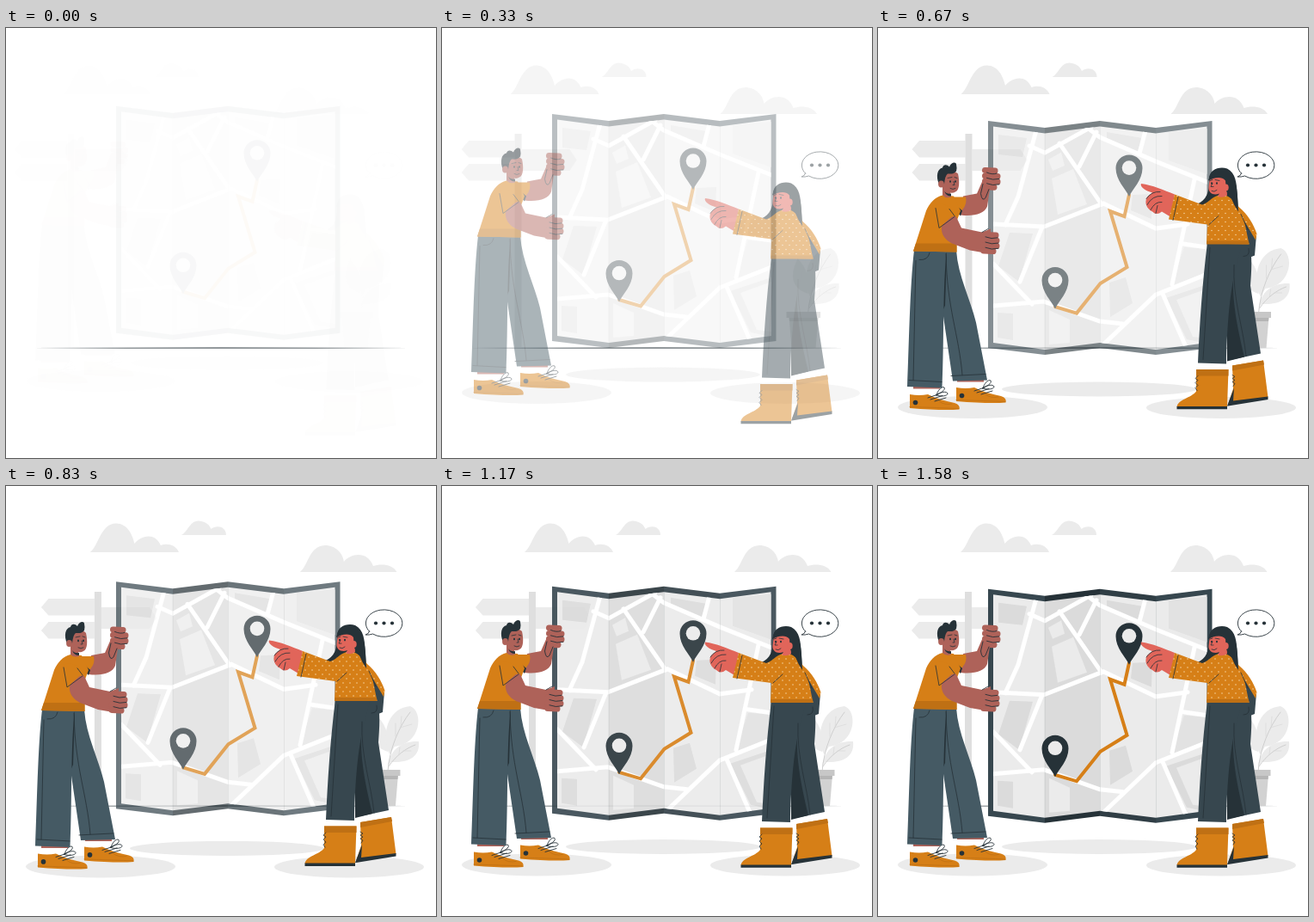
Write an HTML page with a canvas that moves like this. It is 500 by 500 pixels and loops after 1620 ms.

```html
<!DOCTYPE html>
<html lang="en">
<head>
<meta charset="utf-8">
<title>Map guide</title>
<style>
html, body { margin: 0; width: 100%; height: 100%; overflow: hidden; background: #fff; }
canvas { display: block; width: 500px; height: 500px; }
</style>
</head>
<body>
<canvas id="stage"></canvas>
<script>
const LOOP = 1620, LEAD = 30, SIZE = 500;
const INK = '#263238', SLATE = '#37474f', STEEL = '#455a64';
const ORANGE = '#d67f17', RUST = '#bf7014', TAN = '#ae6259', CORAL = '#e1655a';
const PALE = '#ebebeb', GREY = '#dbdbdb', WHITE = '#fff';

const ratio = window.devicePixelRatio || 1;
const stage = document.getElementById('stage');
const buffer = document.createElement('canvas');
for (const c of [stage, buffer]) c.width = c.height = Math.round(SIZE * ratio);
const screen2d = stage.getContext('2d');
const ctx = buffer.getContext('2d');

// Drawing helpers
function fill(color, path) {
  ctx.fillStyle = color;
  ctx.fill(new Path2D(path));
}
function line(path, color = INK, width = 0.8) {
  ctx.strokeStyle = color;
  ctx.lineWidth = width;
  ctx.stroke(new Path2D(path));
}
function oval(color, x, y, rx, ry = rx) {
  ctx.fillStyle = color;
  ctx.beginPath();
  ctx.ellipse(x, y, rx, ry, 0, 0, Math.PI * 2);
  ctx.fill();
}
function clipped(path, draw) {
  ctx.save();
  ctx.clip(new Path2D(path));
  draw();
  ctx.restore();
}

// Scenery
function drawFloor() {
  fill(INK, 'M30 372Q250 370.9 470 372Q250 373.1 30 372Z');
}
function drawShadows() {
  oval(PALE, 257, 419.5, 113, 8.5);
  oval(PALE, 110, 440.5, 87, 13);
  oval(PALE, 399, 441, 87, 12.5);
}
function drawClouds() {
  fill(PALE, 'M96 77C106 69 108 44 126 43.5C139 43.5 145 56 147.500 67C154 59 170 52 178 69C186 66 196 69 199 77Z');
  fill(PALE, 'M202 57C210 53 211 41 222 40.500C231 41 235 46 236.500 50C243 45 254 47 254 57Z');
  fill(PALE, 'M340 100C350 92 350 70 369 69C382 69 390 79 391 88C398 79 418 74 425 93C434 90 448 91 452.500 100Z');
}
function drawSign() {
  fill(PALE, 'M39 141L47.500 131H101V150.500H47.500ZM39 168L47.500 158H101V177.500H47.500Z');
  fill(PALE, 'M109 141H165L173 153.500L165 166H109Z');
  fill('#dfdfdf', 'M101 123H109V372H101Z');
}
function drawPlant() {
  fill(PALE, 'M442 309C423 303 420 288 430 268C442 279 444 296 442 309Z');
  fill(PALE, 'M442 307C435 282 445 258 468 256C484 262 481 300 450 303L444 312Z');
  fill(PALE, 'M442 325C445 305 460 296 478 297C480 315 466 322 446 321Z');
  line('M442 332C444 305 455 280 468 263M443 326C452 313 463 305 474 301', '#cfcfcf', 1);
  line('M451 291L451 276M456 281L470 277M457 281L458 268M455 312L456 304M460 308L469 308', '#d8d8d8', 0.7);
  fill('#d2d2d2', 'M420 336H454L451 372H423Z');
  fill('#b5b5b5', 'M420 336H454L453.500 341H420.500Z');
  fill('#c7c7c7', 'M417 330H456.500V337H417Z');
}

// Map
function drawPin(x, y) {
  fill(INK, `M${x} ${y + 33}C${x - 4} ${y + 24} ${x - 15.5} ${y + 14} ${x - 15.5} ${y}
    A15.5 15.5 0 0 1 ${x + 15.5} ${y}C${x + 15.5} ${y + 14} ${x + 4} ${y + 24} ${x} ${y + 33}Z`);
  oval(PALE, x, y - 0.5, 8.3);
}
function drawMap() {
  const edges = [128, 194, 258, 323, 388.5];
  const folds = [0, 8, 0, 8, 0];
  const frame = [SLATE, INK, '#303e45', SLATE];
  const paper = [PALE, GREY, PALE, PALE];
  ctx.translate(0, 0.8);
  frame.forEach((color, i) => {
    const a = edges[i], b = edges[i + 1], p = folds[i], q = folds[i + 1];
    fill(color, `M${a} ${119 + p}L${b} ${119 + q}V${383 + q}L${a} ${383 + p}Z`);
    const l = i ? a : 134, r = i < 3 ? b : 382.5;
    fill(paper[i], `M${l} ${125.5 + p}L${r} ${125.5 + q}V${377 + q}L${l} ${377 + p}Z`);
  });
  clipped('M134 125.500L194 133.500L258 125.500L323 133.500L382.500 125.500V377L323 385L258 377L194 385L134 377Z', drawStreets);
  line('M194 128V390M258.500 120V382M323.500 128V390', 'rgba(38,50,56,.14)', 0.7);
  line('M206 335L231 342.500L258.500 308L289.500 289L270 224L286.500 230L292 205', ORANGE, 4);
  drawPin(292, 174);
  drawPin(206, 304.5);
}
function drawStreets() {
  fill(GREY, 'M140 135L173 139L168 161L140 158ZM153 249L180 250L164 306L140 288ZM139 342L157 343V374L139 371Z');
  fill(GREY, 'M266 132L307 139L301 157L266 139ZM296 205L319 204L318 233L294 223ZM269 307L288 301L296 331L270 347Z');
  fill('#e2e2e2', 'M338 132L383 128V181L338 165ZM356 266L383 268V295L341 311Z');
  fill(GREY, 'M335 325L383 309V378L359 373Z');
  fill(PALE, 'M347 327L383 314V372L366 370Z');
  fill(PALE, 'M198 164L213 155.500L217 171L203 177ZM202 186L227 175L243 216L209 228ZM199 339L223 350V377L199 379Z');
  line('M185 126L163 207L148 240M134 239L193 242L262 215L323 244L360 239M191 242L165 306M134 285L179 332', WHITE, 5);
  line('M134 334L193 329L258 352L285 355M176 148L194 156L248 126M211 145L260 216M234 172L254 132', WHITE, 5);
  line('M241 125L258 138L323 166L383 190M368 187L342 309M355 262L383 266M383 297L323 321L262 379M331 320L359 384M311 130L304 157', WHITE, 5);
}

// People
function drawShoe(x, y) {
  ctx.save();
  ctx.translate(x, y);
  fill(ORANGE, 'M0 0Q11 2 21 0C31 5 42 8 52 10Q59 12 57.500 17.500Q38 19 0 16Z');
  line('M0 14.500Q35 15.500 57 16.500M34 8Q40 13 49 11', RUST, 0.8);
  oval(INK, 6.5, 9.5, 2.8);
  line('M21 4L33 0M24 6L38 1.500M29 8L42 4M31 1C32 -4 37 -10 40 -8C42 -5 35 -1 30 1C36 -3 43 -4 44 -1C44 2 36 3 31 1', INK, 0.9);
  ctx.restore();
}
function drawFingers(x, y, gap, reach) {
  reach.forEach((end, i) => line(`M${x} ${y + i * gap}L${end} ${y + i * gap + 0.5}`, TAN, 7));
  for (let i = 0; i < 3; i++) {
    const cy = y + (i + 0.55) * gap;
    line(`M${x + 2} ${cy - 1}Q${x + 9} ${cy + 2} ${reach[i] + 2} ${cy}`, INK, 0.9);
  }
}
function drawMan() {
  // Raised arm
  fill(TAN, 'M99 195L115 192L122 176L130 187L127 207C124 215 112 219 96 217Z');
  drawFingers(124.5, 165, 6.4, [136, 139, 139, 135]);
  line('M122 181L119.500 192Q121 202 125 197L129 187', INK, 0.9);
  fill(ORANGE, 'M86 196L102 196Q104 204 98 211L92 213Z');
  fill(INK, 'M89 204L98 212L96 218L90 212Z');

  // Legs and shoes
  fill(WHITE, 'M37 416H73V428H38ZM90 408L125 408L124 420H91Z');
  fill(TAN, 'M41 416H72V419H41ZM92 408H123V411H92Z');
  drawShoe(37, 425.5);
  drawShoe(91, 417.5);
  fill(STEEL, 'M64 258H91C93 288 108 316 114 342L127 409L87 410L75 328Z');
  fill(INK, 'M80 260L75 265L74.500 330L78 322Z');
  fill(STEEL, 'M42 258H80C75 300 77 360 74.500 418L34 416.500C36 370 37 300 42 258Z');
  line('M36 409L74 411M85 404L125 402M44 270L41 409M79 262C80 325 94 355 98 403M60 261Q58 270 48 269');

  // Torso and front arm
  fill(ORANGE, 'M75 194C66 196 60 203 56 212L41 259L91.500 260V224L96 212L88 195Z');
  fill(RUST, 'M44 250H91.500V260L41 259Z');
  fill(TAN, 'M74 231C78 221 86 217 91 219L97 232L121 237L131 233L130 262L107 258L86 250C78 246 73 239 74 231Z');
  drawFingers(123, 240, 6.2, [137, 138, 138, 134]);
  line('M121 237L128 233');
  fill(ORANGE, 'M67 207C72 201 83 204 88 217L71 232Z');
  line('M67 209L71 232L89 219M83 210L89 218');

  // Head
  fill(TAN, 'M76 168C83 165 91 166 93 169C95 178 95 188 90 190Q87 192 84 191L85 196Q79 198 75 194V180Z');
  fill(INK, 'M77 189Q80 193 85 192V195Q79 195 77 189Z');
  fill(INK, 'M71 181C67 172 69 163 75 162C76 158 80 158 83 161C85 155 91 155 91 158Q92 162 91 166C88 170 84 169 81 169Q78 171 77 181Z');
  oval(TAN, 73.5, 181, 3.4, 4);
  oval(INK, 84, 178, 1, 1.3);
  oval(INK, 90, 178, 1, 1.3);
  line('M81 174L86 173M89 173L92 174M88 178L89 182H87M84 186Q87 188 90 186', INK, 0.8);
}
function drawDots() {
  for (let row = 0; row < 12; row++) {
    for (let col = 0; col < 14; col++) {
      oval('#f5d6a6', 340 + col * 8 + (row % 2) * 4, 196 + row * 5, 0.75);
    }
  }
}
function drawWoman() {
  // Hair behind the shoulders
  fill(INK, 'M385 176C385 165 397 161 406 164C416 169 417 180 418 197L419 214L383 238C384 225 380 211 368 206C378 204 385 196 385 180Z');
  fill(SLATE, 'M420 213L434 231L440 241L438 265L433 267L428 243Z');

  // Legs and boots
  fill(WHITE, 'M372 388H407V399H372ZM411 383L445 377L447 388L412 394Z');
  fill(ORANGE, 'M412 393L448 387L453.500 430L407 438L413 420Z');
  fill(RUST, 'M412 393L448 387L449 392L412 399Z');
  fill(INK, 'M406 440L414 419L413 434L453.500 429V432.500L407 440Z');
  line('M412 404L415 406L412 408L415 410L412 412L415 414L413 417');
  fill(ORANGE, 'M370 397.500H407.500L406 441H347.500C349 432 364 431 370 423Z');
  fill(RUST, 'M370 397.500H407.500V405H370Z');
  fill(INK, 'M347.500 440.500H406V443.800H347.500Z');
  line('M372 405L369 408L372 410L369 413L372 416L369 419L371 422');
  fill(SLATE, 'M400 250H431C436 263 434 285 433 300L445 379L412 386L406 300Z');
  fill(INK, 'M414 274C408 288 405 303 406 345V388L426 383C417 345 410 312 414 274Z');
  fill(SLATE, 'M383 250H424C414 285 407 310 405 391L372 390C374 345 377 298 383 250Z');
  line('M386 256L378 386M431 257Q433 266 425 266M414 276C412 315 425 350 428 382');

  // Pointing hand
  fill(CORAL, 'M306 181.500C319 183 332 189 345 194L340 220L330 214Q324 219 319 214C313 211 309 204 313 197L319 192C311 190 304 185 306 181.500Z');
  line('M328 191Q318 190 312 199M330 196Q319 195 313 206M330 203Q322 202 317 212M325 207L323 216');

  // Blouse
  const blouse = 'M345 194L377 206C384 204 388 197 396 195C406 192 414 201 420 209C430 217 437 229 440.500 240L439 247L426 225L431.500 252L382 251L383 229L338 223Z';
  fill(ORANGE, blouse);
  clipped(blouse, drawDots);
  fill(RUST, 'M382.500 248H431L431.500 252H382Z');
  line('M349 197L343 224M385 229L396 219M422 217L430 235');

  // Head
  fill(CORAL, 'M386 174C393 168 402 169 405 178L406 195Q400 199 395 196L397 193C390 196 384 192 384.500 186Z');
  fill(INK, 'M384 178C390 175 399 172 404 178L405 190L411 199Q414 207 419 214L418 196C417 176 411 163 397 164Q386 166 384 178Z');
  oval(CORAL, 404.5, 186, 3.2, 4);
  oval(INK, 388, 181, 1, 1.3);
  oval(INK, 394, 181, 1, 1.3);
  line('M386 178L389 177M392 177L397 178M389 181L387 185H390M388 190Q391 192 394 189', INK, 0.8);
}
function drawBubble() {
  const shape = 'M422.500 169A21.300 15.700 0 1 1 426.500 172Q422 173.500 418 173Q422 172 422.500 169Z';
  fill(WHITE, shape);
  line(shape, INK, 0.9);
  for (const x of [430, 439.5, 449]) oval(INK, x, 159.5, 2.1);
}

// Easing
function bezier(x1, y1, x2, y2) {
  const at = (a, b, s) => 3 * a * s * (1 - s) ** 2 + 3 * b * s * s * (1 - s) + s ** 3;
  return x => {
    if (x >= 1) return 1;
    let lo = 0, hi = 1;
    for (let i = 0; i < 24; i++) {
      const mid = (lo + hi) / 2;
      if (at(x1, x2, mid) < x) lo = mid; else hi = mid;
    }
    return at(y1, y2, lo);
  };
}
const overshoot = bezier(0.36, -0.01, 0.5, 1.38);
const easeOut = bezier(0, 0, 0.58, 1);

// Each layer slides in from (dx, dy) while fading in.
const quick = (draw, dx, dy) => ({ draw, dx, dy, span: 1000, ease: overshoot });
const layers = [
  { draw: drawFloor, dx: 0, dy: 0, span: 1, ease: () => 1 },
  quick(drawShadows, 0, -30),
  quick(drawClouds, -30, 0),
  quick(drawSign, -30, 0),
  quick(drawPlant, -30, 0),
  { draw: drawMap, dx: 0, dy: -30, span: LOOP, ease: easeOut },
  quick(drawMan, 0, -30),
  quick(drawWoman, 0, 30),
  quick(drawBubble, 0, 0)
];

function render(time) {
  screen2d.globalAlpha = 1;
  screen2d.fillStyle = WHITE;
  screen2d.fillRect(0, 0, stage.width, stage.height);
  for (const { draw, dx, dy, span, ease } of layers) {
    const p = ease((time + LEAD) / span);
    ctx.setTransform(1, 0, 0, 1, 0, 0);
    ctx.clearRect(0, 0, buffer.width, buffer.height);
    ctx.setTransform(ratio, 0, 0, ratio, dx * (1 - p) * ratio, dy * (1 - p) * ratio);
    draw();
    screen2d.globalAlpha = Math.max(0, Math.min(1, p));
    screen2d.drawImage(buffer, 0, 0);
  }
}

const start = performance.now();
function tick() {
  render((performance.now() - start) % LOOP);
  requestAnimationFrame(tick);
}
ctx.lineCap = 'round';
tick();
</script>
</body>
</html>
```
